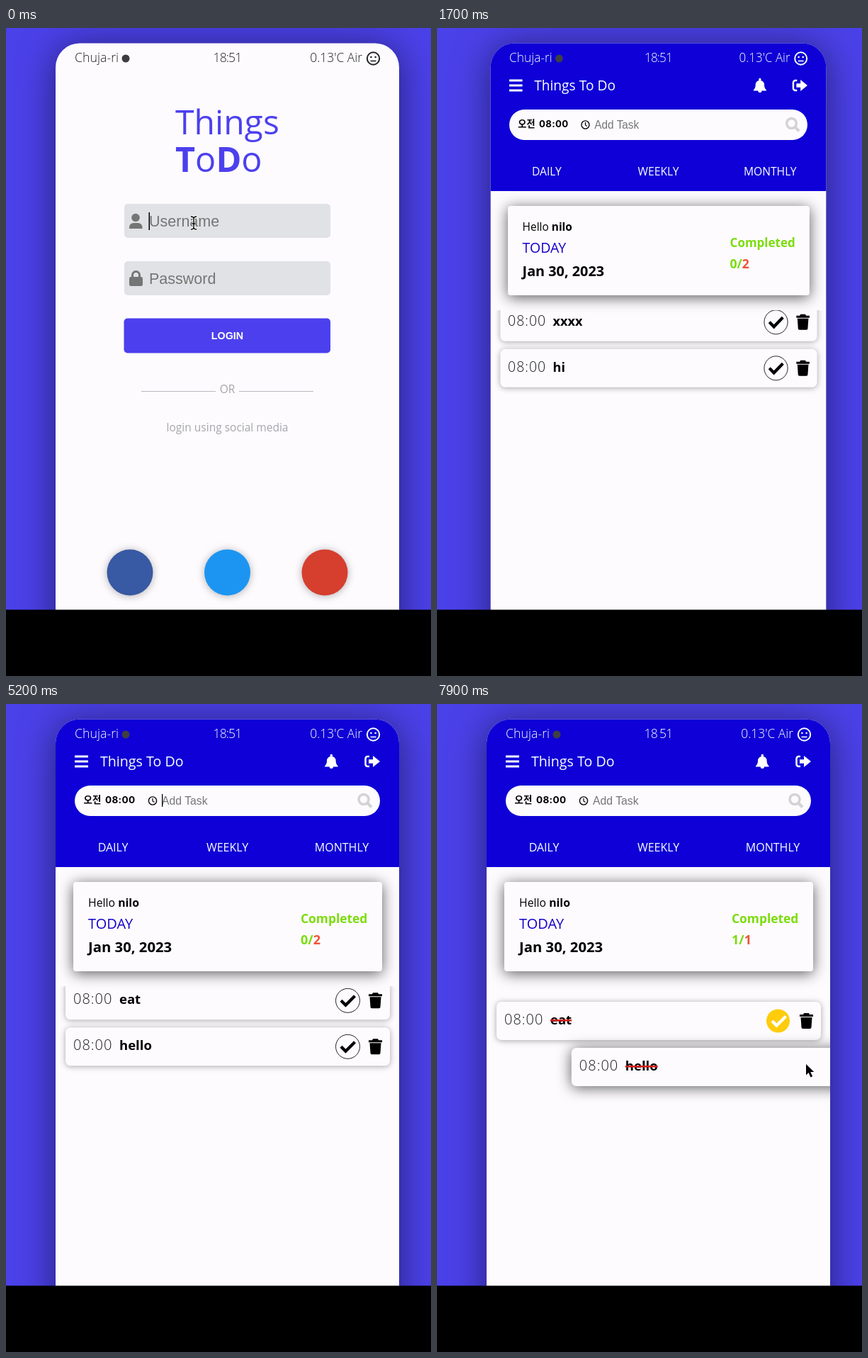
Animation of 600 by 914 pixels, one loop 8 s. Source, as an HTML page with a canvas:

```html
<!DOCTYPE html>
<html lang="en">
<head>
<meta charset="utf-8">
<title>Things To Do</title>
<style>
html, body { margin: 0; width: 600px; height: 914px; overflow: hidden; background: #000; }
canvas { display: block; }
</style>
</head>
<body>
<canvas width="600" height="914"></canvas>
<script>
const c = document.querySelector('canvas').getContext('2d');
const LOOP = 8000, MID = 312.5;
const SANS = '"Open Sans", "Noto Sans", sans-serif';
const ARIAL = '"Liberation Sans", Arial, sans-serif';
const INTER = 'Inter, Roboto, sans-serif';
const KOREAN = '"Noto Sans CJK KR", "Noto Sans CJK JP", sans-serif';
const PAPER = '#fdfbfe', BLUE = '#0e00d6', VIOLET = '#4c40ee', GREY = '#757575';

const clamp = p => Math.max(0, Math.min(1, p));
const smooth = p => (p = clamp(p), p * p * (3 - 2 * p));
const smoother = p => (p = clamp(p), p * p * p * (10 - 15 * p + 6 * p * p));

// Draws text and returns the x where it ends.
function text(str, x, y, size, fill, { weight = 400, font = SANS, align = 'left', spacing = 0 } = {}) {
  c.font = `${weight} ${size}px ${font}`;
  c.textAlign = align;
  c.letterSpacing = spacing + 'px';
  c.fillStyle = fill;
  c.fillText(str, x, y);
  return x + c.measureText(str).width;
}
function box(x, y, w, h, r, fill) {
  c.beginPath();
  c.roundRect(x, y, w, h, r);
  c.fillStyle = fill;
  c.fill();
}
function disc(x, y, r, fill, line, width = 1) {
  c.beginPath();
  c.arc(x, y, r, 0, 7);
  if (fill) { c.fillStyle = fill; c.fill(); }
  if (line) { c.strokeStyle = line; c.lineWidth = width; c.stroke(); }
}
function fill(d, color) {
  c.fillStyle = color;
  c.fill(new Path2D(d));
}
function stroke(d, color, width) {
  c.strokeStyle = color;
  c.lineWidth = width;
  c.stroke(new Path2D(d));
}
function shadowed(blur, alpha, dy, draw) {
  c.save();
  c.shadowColor = `rgba(0,0,0,${alpha})`;
  c.shadowBlur = blur;
  c.shadowOffsetY = dy;
  draw();
  c.restore();
}

function statusBar(color, dot, colon) {
  const thin = { weight: 300 }, tight = { weight: 300, spacing: -.9 };
  text('Chuja-ri', 97, 48, 17.8, color, thin);
  disc(169, 43, 5.5, dot);
  let x = text('18', 292.5, 48, 17.6, color, tight);
  x = text(':', x, 48, 17.6, colon ? color : 'transparent', tight);
  text('51', x, 48, 17.6, color, tight);
  text("0.13'C Air", 503, 48, 17.4, color, { weight: 300, align: 'right' });
  disc(518.5, 43, 8.7, null, color, 2);
  disc(515.4, 41, 1.3, color);
  disc(521.6, 41, 1.3, color);
  stroke('M514.5 46.5h8', color, 1.6);
}

function loginScreen(t, hover) {
  statusBar('#222', '#3b3b40', t % 2000 < 1000);
  text('gs', text('Thin', 239, 149.5, 48, VIOLET), 149.5, 48, VIOLET, { weight: 500 });
  let x = 239;
  for (const ch of 'ToDo') x = text(ch, x, 203, 48.5, VIOLET, { weight: ch === 'o' ? 400 : 700 });

  box(167, 248, 291, 48, 5, '#e0e2e5');
  disc(183, 267.5, 5.8, GREY);
  fill('M174 283v-2a6 6 0 0 1 6-6h6.500a6 6 0 0 1 6 6v2z', GREY);
  text('Username', 202, 280, 21.5, GREY, { font: ARIAL });
  if (t < 1250 && t % 1000 < 500) box(201.5, 260, 1.5, 25, 0, '#000');

  box(167, 329, 291, 48, 5, '#e0e2e5');
  box(174, 351, 19, 13, 2.5, GREY);
  stroke('M178.500 352v-3.500a5 5 0 0 1 10 0v3.500', GREY, 3);
  text('Password', 202, 361, 21.5, GREY, { font: ARIAL });

  box(166.5, 409.5, 291.5, 49, 5, hover ? BLUE : VIOLET);
  text('LOGIN', MID, 439, 14.3, '#fff', { weight: 700, font: ARIAL, align: 'center' });

  stroke('M191 512.500H296M329 512.500H434', '#b9b9bd', 1);
  text('OR', MID, 515, 15.5, '#a6a6aa', { align: 'center' });
  text('login using social media', MID, 569, 15.5, '#a6a6aa', { align: 'center' });
  ['#3859a3', '#1c95f2', '#d63e2e'].forEach((color, i) =>
    shadowed(12, .3, 1, () => disc(175 + i * 137.5, 768, 32.5, color)));
}

const TASKS = [
  { name: 'eat', born: 5050, done: 6750 },
  { name: 'hello', born: 4500, done: 7150, del: 7717 },
  { name: 'xxxx', born: -1e4, del: 2220 },
  { name: 'hi', born: -1e4, del: 3000 }
];
const SLIDE = 400, ROW = 65;
const grown = (task, t) => smooth((t - task.born) / 280);
const room = (task, t) => grown(task, t) * (1 - smooth((t - (task.del ?? 1e5) - SLIDE) / 267));

function taskRow(task, y, t) {
  const out = clamp((t - (task.del ?? 1e5)) / SLIDE);
  const done = t >= task.done;
  c.save();
  c.translate(500 * out * out, y);
  shadowed(out ? 20 : 9, out ? .65 : .35, out ? 2 : 1, () => box(84, 0, 458, 54, 7, PAPER));
  text('08:00', 95, 32, 20, '#222', { weight: 300, spacing: 1 });
  const end = text(task.name, 160, 32, 18.5, '#000', { weight: 700 });
  if (done) {
    box(160, 25, end - 160, 2.5, 0, '#d8201c');
    disc(481.5, 27, 16.5, '#ffcc0c');
  } else {
    disc(482.5, 27, 17, null, '#222', 1);
  }
  stroke('M473 27l6.500 6.500 13-13', done ? '#fff' : '#000', 4.3);
  fill('M512 18h5l1-2h7l1 2h5v3h-19zM513.500 22h16l-1 14a2 2 0 0 1-2 2h-10a2 2 0 0 1-2-2z', '#000');
  c.restore();
}

function taskList(t) {
  c.save();
  c.beginPath();
  c.rect(70, 398, 485, 430);
  c.clip();
  let y = 420 - ROW * (1 - smooth((t - 1560) / 280));
  for (const task of TASKS) {
    if (t >= task.born && t < (task.del ?? 1e5) + SLIDE)
      taskRow(task, y - ROW * (1 - grown(task, t)), t);
    y += ROW * room(task, t);
  }
  c.restore();
}

// Each word: first key, time per key, moment it is entered.
const TYPING = [['hello', 3900, 115, 4500], ['eat', 4720, 90, 5050]];
function typed(t) {
  for (const [word, start, step, enter] of TYPING)
    if (t >= start && t < enter) return word.slice(0, 1 + (t - start) / step);
  return '';
}

function suggestions(word) {
  const hits = ['hi', 'Hello', 'hello there', 'helloo'].filter(s => s.toLowerCase().startsWith(word));
  if (!word || !hits.length) return;
  shadowed(8, .4, 2, () => box(332, 158, 129, 10 + 43 * hits.length, 4, '#242529'));
  fill('M346 159l9-8.500q2.500-2.500 5 0l9 8.500z', '#242529');
  hits.forEach((s, i) => text(s, 346, 190 + 43 * i, 15.2, '#e9e9ea', { font: INTER }));
}

function appScreen(t) {
  box(70, 21.5, 485, 208.5, [34, 34, 0, 0], BLUE);
  statusBar('#fff', '#3f3f44', t % 1200 < 600);
  stroke('M97 74h19M97 81h19M97 88h19', '#fff', 2.8);
  text('Things To Do', 133, 88, 19.6, '#fff');
  fill('M450 87.500c2-2 3-4 3-7.500a6.300 6.300 0 0 1 12.600 0c0 3.500 1 5.500 3 7.500v1h-18.600z', '#fff');
  disc(459.3, 72.5, 1.8, '#fff');
  disc(459.3, 88.5, 2.6, '#fff');
  stroke('M513 74h-2.500a3 3 0 0 0-3 3v8a3 3 0 0 0 3 3h2.500', '#fff', 2.5);
  fill('M512 78.200h6v-5.200l10 8-10 8v-5.200h-6z', '#fff');

  box(97, 115, 431, 43, 21.5, PAPER);
  text('오전', 109.5, 140, 13.5, '#000', { weight: 700, font: KOREAN });
  text('08:00', 140, 140, 13.6, '#000', { weight: 700, font: INTER, spacing: .3 });
  disc(207, 136.5, 5.6, null, '#000', 1.4);
  stroke('M207 133v4l2.500 1.500', '#000', 1.2);
  const word = typed(t);
  const end = text(word, 220, 142, 16, '#000', { font: ARIAL });
  if (!word) text('Add Task', 220, 142, 15.7, GREY, { font: ARIAL });
  if (t > 3650 && t < 5400 && (word || t % 1000 < 500)) box(end, 127, 1.3, 18, 0, '#000');
  disc(505, 134.5, 7, null, '#d3d3d6', 3.6);
  stroke('M510 139.500l6 6', '#d3d3d6', 4);
  ['DAILY', 'WEEKLY', 'MONTHLY'].forEach((s, i) =>
    text(s, 151 + 161.5 * i, 208, 16, '#fff', { align: 'center' }));

  taskList(t);

  shadowed(20, .65, 3, () => box(95, 251, 436, 126, 4, PAPER));
  text('nilo', text('Hello ', 116, 286, 15.8, '#000'), 286, 15.8, '#000', { weight: 700 });
  text('TODAY', 116, 317, 20, '#1400c8');
  text('Jan 30, 2023', 116, 349.5, 20.3, '#000', { weight: 700 });
  text('Completed', 416, 308.5, 17.4, '#7bdc0b', { weight: 700 });
  const alive = TASKS.filter(k => t >= k.born && t < (k.del ?? 1e5));
  const done = alive.filter(k => t >= k.done).length;
  text(alive.length, text(done + '/', 416, 339, 18, '#7bdc0b', { weight: 700 }), 339, 18, '#f0523c', { weight: 700 });

  suggestions(word);
}

const PATH = [
  [0, 265, 275], [300, 265, 275], [1150, 314, 438], [1500, 314, 438],
  [1850, 420, 442], [2150, 521, 444], [2250, 521, 444], [2700, 530, 458],
  [2950, 522, 445], [3100, 522, 445], [3600, 300, 137], [5400, 300, 137],
  [6200, 573, 491], [6350, 573, 491], [6700, 484, 447], [6800, 484, 447],
  [7050, 484, 511], [7200, 484, 511], [7550, 521, 508], [8000, 521, 508]
];
function pointer(t) {
  const i = PATH.findIndex(k => k[0] > t);
  const [t0, x0, y0] = PATH[i - 1], [t1, x1, y1] = PATH[i];
  const p = smooth((t - t0) / (t1 - t0));
  return [x0 + (x1 - x0) * p, y0 + (y1 - y0) * p];
}
const within = (v, a, b) => v >= a && v <= b;

function drawPointer(x, y, kind) {
  c.save();
  c.translate(x, y);
  c.lineJoin = 'round';
  if (kind === 'beam') {
    const d = 'M-4-9q4 0 4 3q0-3 4-3M0-6V6M-4 9q4 0 4-3q0 3 4 3M-2.500 1h5';
    stroke(d, '#fff', 3.2);
    stroke(d, '#000', 1.4);
  } else if (kind === 'hand') {
    const d = 'M-3.500 1.500a2 2 0 0 1 4 0v6l2-.8 2 1 2 .2 2.500 2v5l-2 4.500h-8l-4.500-6-2.500-3.500 1.500-1.500 3 2z';
    stroke(d, '#000', 2);
    fill(d, '#fff');
    stroke('M1.500 12v4M4 12v4M6.500 12v4', '#000', .8);
  } else {
    const d = 'M0 0v15.500l3.600-3.400 2.800 6.400 2.700-1.200-2.800-6.300h5z';
    stroke(d, '#fff', 2);
    fill(d, '#000');
  }
  c.restore();
}

function draw(now) {
  const t = now % LOOP;
  const turn = Math.PI * smoother((t - 1300) / 510);
  const front = turn < Math.PI / 2;
  const [x, y] = pointer(t);
  const onButton = front && within(x, 167, 458) && within(y, 410, 458);
  const onField = front
    ? within(x, 167, 458) && (within(y, 248, 296) || within(y, 329, 377))
    : within(x, 190, 490) && within(y, 115, 158);

  c.fillStyle = '#4b41e9';
  c.fillRect(0, 0, 600, 914);
  c.save();
  c.translate(MID, 0);
  c.scale(Math.max(.002, Math.abs(Math.cos(turn))), 1);
  c.translate(-MID, 0);
  shadowed(52, .5, 5, () => box(70, 21.5, 485, 860, 34, PAPER));
  front ? loginScreen(t, onButton) : appScreen(t);
  c.restore();

  const hidden = within(t, 1450, 1850) || within(t, 3850, 5450);
  if (!hidden) drawPointer(x, y, onButton ? 'hand' : onField ? 'beam' : 'arrow');
  c.fillStyle = '#000';
  c.fillRect(0, 820.5, 600, 94);
  requestAnimationFrame(draw);
}
requestAnimationFrame(draw);
</script>
</body>
</html>
```
